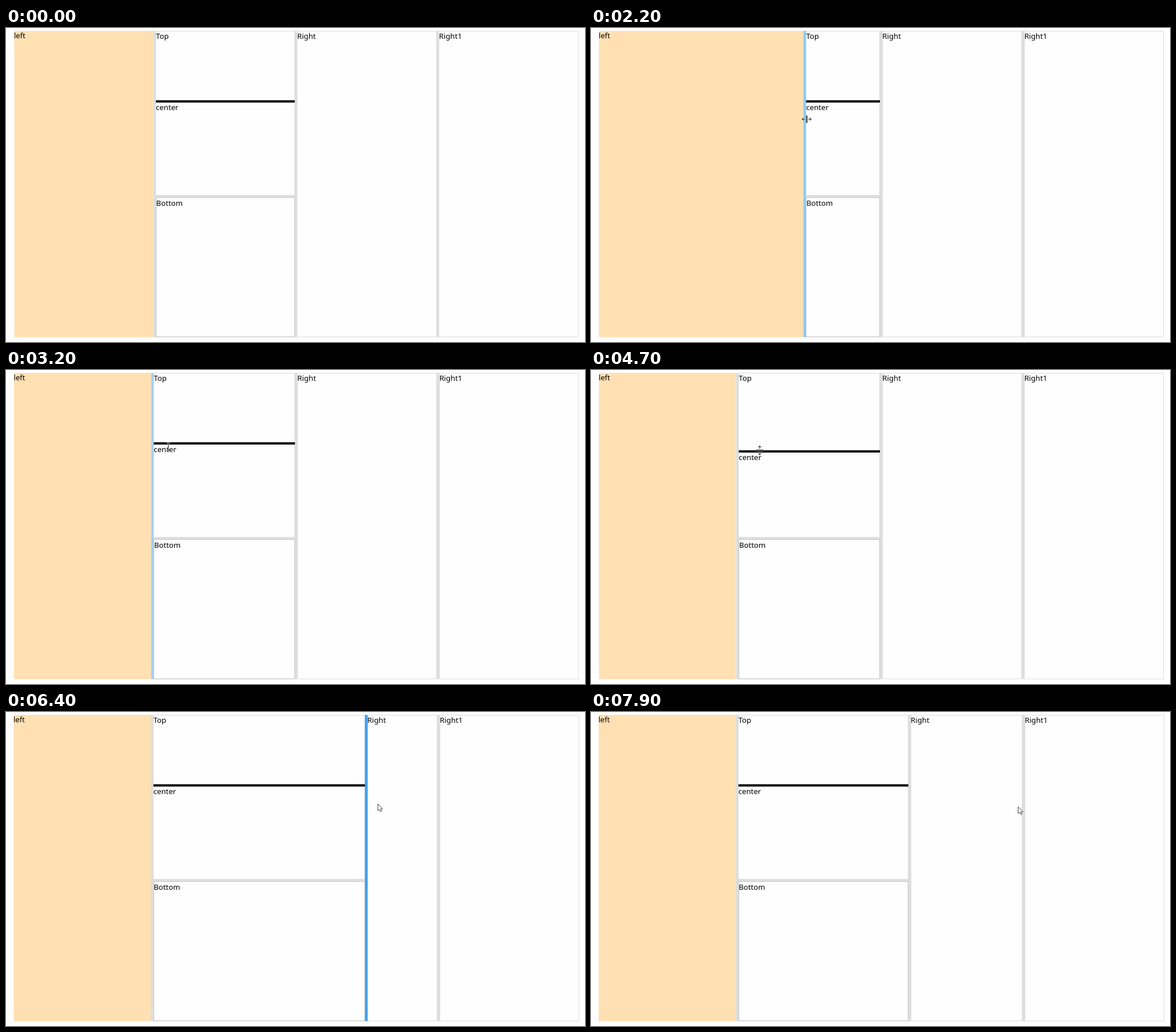
An HTML page with a canvas for the animation above (8000 ms loop, 1016 by 551 pixels).

```html
<!DOCTYPE html>
<html lang="en">
<head>
<meta charset="utf-8">
<title>Split panes</title>
<style>
html, body { margin: 0; width: 100%; height: 100%; overflow: hidden; background: #fefefe; }
canvas { display: block; }
</style>
</head>
<body>
<canvas id="stage" width="1016" height="551"></canvas>
<script>
const ctx = document.getElementById('stage').getContext('2d');
const TOP = 5, END = 542.5, GAP = 4.7;
const GREY = [222, 222, 222], PALE = [140, 202, 252], BLUE = [64, 160, 245];

// Progress from 0 to 1 between two steps of 100 ms.
const ramp = (t, a, b) => Math.min(1, Math.max(0, (t - a) / (b - a)));
const smooth = (t, a, b) => { const u = ramp(t, a, b); return u * u * (3 - 2 * u); };
const out = (t, a, b) => 1 - (1 - ramp(t, a, b)) ** 3;
const lerp = (a, b, u) => a + (b - a) * u;

function layout(t) {
  const grow = (t >= 16 ? 0.6 : 0) + (t >= 60 ? 0.8 : 0);
  const drag = 77 * (smooth(t, 38, 42) - smooth(t, 43, 48.5));
  return {
    left: 14.5 - grow * 0.7,
    col2: 263 + 120 * ramp(t, 17.9, 22.2) - 123.7 * smooth(t, 24, 32) - (t >= 60 ? 0.6 : 0),
    col3: 511.4 + grow / 2 + 122.4 * smooth(t, 59, 64) - 73 * smooth(t, 66, 70),
    col4: 760.2 + grow,
    right: 1004.6 + grow,
    drag,
    bar: 126.8 + Math.min(drag, 70),
    glow2: ramp(t, 11, 13) - ramp(t, 31.7, 32.7),
    glow3: ramp(t, 53, 58) - ramp(t, 71, 74)
  };
}

// Each phase: first step, pointer shape, position.
const phases = [
  [3, 'arrow', t => [lerp(1000, 267, out(t, 3, 11)), lerp(55, 154, out(t, 3, 11))]],
  [12, 'cols', (t, s) => [s.col2 - 2, 160]],
  [18, 'arrow', (t, s) => [s.col2 + 4, 156]],
  [19, 'cols', (t, s) => [s.col2 + 1, 160]],
  [32, 'beam', t => [285, 135]],
  [34, 'rows', (t, s) => [lerp(291, 296, ramp(t, 38, 42)), 127 + s.drag]],
  [50, 'arrow', t => [lerp(308, 496, ramp(t, 50, 53)), lerp(131, 137, ramp(t, 50, 53))]],
  [54, 'cols', (t, s) => [s.col3 + 1, lerp(144, 157, ramp(t, 59, 63))]],
  [64, 'arrow', (t, s) => [s.col3 + 17.5, 161]],
  [67, 'cols', (t, s) => [s.col3 - 2, lerp(160, 175, ramp(t, 66, 70))]],
  [72, 'arrow', t => [lerp(575, 749, out(t, 72, 79)), lerp(172, 166, out(t, 72, 79))]]
];

const shapes = {
  arrow: new Path2D('M.5.5V12.2L3.2 9.8 5.2 14 7.2 13 5.3 9H9.2Z'),
  cols: new Path2D('M-.6-6.5V6.5M.8-6.5V6.5M-3 0H-8M-5.5-2.5L-8 0-5.5 2.5M3 0H8M5.5-2.5L8 0 5.5 2.5'),
  rows: new Path2D('M-6.5-.6H6.5M-6.5.8H6.5M0-3V-8M-2.5-5.5L0-8 2.5-5.5M0 3V8M-2.5 5.5L0 8 2.5 5.5'),
  beam: new Path2D('M-3-7H3M0-7V6M-2 6H2')
};

function rect(x, y, w, h, fill) {
  ctx.fillStyle = fill;
  ctx.fillRect(x, y, w, h);
}

function frame(x, y, right, color) {
  ctx.strokeStyle = color;
  ctx.lineWidth = 1;
  x = Math.round(x);
  ctx.strokeRect(x + 0.5, y + 0.5, Math.round(right) - x - 1, END - y - 1);
}

function label(text, x, baseline) {
  ctx.fillStyle = '#000';
  ctx.fillText(text, x, baseline);
}

function splitter(right, glow, hot) {
  const c = GREY.map((v, i) => Math.round(lerp(v, hot[i], glow)));
  rect(right - GAP, TOP, GAP, END - TOP, `rgb(${c})`);
}

function drawPointer(t, s) {
  const phase = phases.filter(p => p[0] <= t).pop();
  if (!phase) return;
  const [, kind, place] = phase, shape = shapes[kind];
  ctx.save();
  ctx.translate(...place(t, s));
  if (kind === 'arrow') {
    ctx.fillStyle = '#fff';
    ctx.fill(shape);
  } else {
    ctx.strokeStyle = 'rgba(255,255,255,.8)';
    ctx.lineWidth = 2.4;
    ctx.stroke(shape);
  }
  ctx.strokeStyle = kind === 'arrow' ? '#444' : '#000';
  ctx.lineWidth = 1;
  ctx.stroke(shape);
  ctx.restore();
}

function draw(ms) {
  const t = Math.floor(ms % 8000 / 100), s = layout(t);
  const edge = s.col3 - GAP, width = edge - s.col2;

  rect(0, 0, 1016, 551, '#fefefe');
  rect(s.left, TOP, s.col2 - GAP - s.left, END - TOP, '#ffe0b2');
  frame(s.col2 - 1, TOP, edge, '#dcdcdc');
  frame(s.col3 - 1, TOP, s.col4 - GAP, '#dcdcdc');
  frame(s.col4 - 1, TOP, s.right, '#dcdcdc');
  splitter(s.col2, s.glow2, PALE);
  splitter(s.col3, s.glow3, BLUE);
  splitter(s.col4, 0, GREY);

  rect(s.col2, 293, width, 4.5, '#dedede');
  frame(s.col2, 297, edge, '#c6c6c6');
  rect(s.col2, s.bar, width, 4, '#000');

  ctx.font = '13.2px "Noto Sans", "Open Sans", sans-serif';
  label('left', s.left - 0.6, 18);
  label('Top', s.col2, 19);
  label('center', s.col2, Math.round(s.bar) + 17);
  label('Bottom', s.col2 + 0.6, 312);
  label('Right', s.col3 - 0.4, 19);
  label('Right1', s.col4 - 0.4, 19);
  drawPointer(t, s);
}

const start = performance.now();
function tick() {
  draw(performance.now() - start);
  requestAnimationFrame(tick);
}
tick();
</script>
</body>
</html>
```
